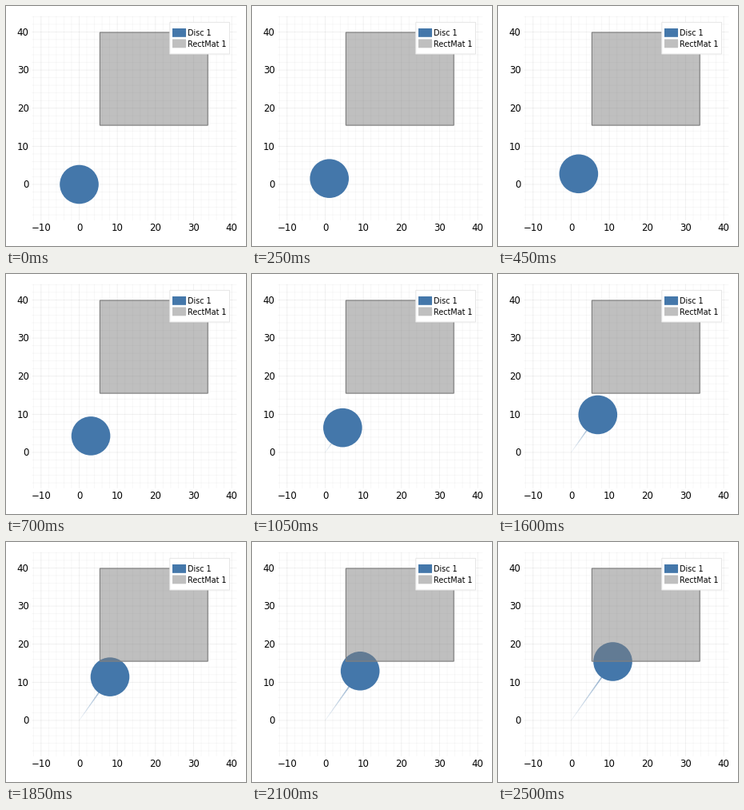
A matplotlib script for the animation above (2.55 s loop, 300 by 300 pixels).

```python
import numpy as np
import matplotlib.pyplot as plt
from matplotlib.animation import FuncAnimation
from matplotlib.collections import LineCollection
from matplotlib.colors import to_rgb
from matplotlib.patches import Circle, Rectangle

SIZE, DPI = 300, 100
PX = 72 / DPI               # one pixel in points
UNIT = 4.765                # pixels per data unit
X0, Y0 = 91.5, 223.0        # pixel position of the data origin
FRAMES, INTERVAL = 51, 50
VELOCITY = np.array([1.04, -1.47])  # pixels per step
BLUE, GRAY = "#4477AA", "#808080"
LEFT, RIGHT, TOP, BOTTOM = 33, 288, 13, 267.5

plt.rcParams["path.snap"] = False
fig = plt.figure(figsize=(SIZE / DPI, SIZE / DPI), dpi=DPI, facecolor="white")
ax = fig.add_axes([0, 0, 1, 1])
ax.set_xlim(0, SIZE)
ax.set_ylim(SIZE, 0)
ax.axis("off")


def label(x, y, text, size, ha):
    ax.text(x, y, text, fontsize=size * PX, family="DejaVu Sans",
            color="black", ha=ha, va="baseline", zorder=8)


def box(x, y, w, h, z, **style):
    ax.add_patch(Rectangle((x, y), w, h, zorder=z, **style))


def draw_grid():
    for value in range(-12, 46, 2):
        alpha = 0.07 if value % 10 == 0 else 0.04
        style = dict(color="black", alpha=alpha, lw=0.8 * PX, zorder=1)
        x, y = X0 + value * UNIT, Y0 - value * UNIT
        if LEFT <= x <= RIGHT:
            ax.plot([x, x], [TOP, BOTTOM], **style)
        if TOP <= y <= BOTTOM:
            ax.plot([LEFT, RIGHT], [y, y], **style)


def draw_ticks():
    for value in range(-10, 41, 10):
        text = str(value).replace("-", "\u2212")
        label(X0 + value * UNIT, 281, text, 11.8, "center")
        if value >= 0:
            label(28.6, Y0 - value * UNIT + 4.2, text, 11.8, "right")


def draw_legend():
    box(204.8, 20.4, 74.7, 39.6, 6, fc="white", ec="#e6e6e6", lw=PX)
    for text, y, fill in [("Disc 1", 28, BLUE), ("RectMat 1", 41.5, "#bfbfbf")]:
        box(208, y, 17, 10.8, 7, fc=fill, ec="none")
        label(226.7, y + 9.4, text, 9.7, "left")


draw_grid()
draw_ticks()
draw_legend()
box(117.4, 33, 134.8, 116.1, 5, fc=to_rgb(GRAY) + (0.5,), ec=GRAY, lw=1.2 * PX)

disc = ax.add_patch(Circle((X0, Y0), 24.3, fc=BLUE, ec="none", zorder=4))
trail = ax.add_collection(LineCollection([], zorder=3, capstyle="butt"))


def draw(step):
    path = np.array([X0, Y0]) + np.arange(step + 1)[:, None] * VELOCITY
    disc.center = tuple(path[-1])
    growth = np.linspace(0, 1, step)
    colors = np.tile(to_rgb(BLUE) + (1.0,), (step, 1))
    colors[:, 3] = 0.1 + 0.65 * growth
    trail.set_segments(np.stack([path[:-1], path[1:]], axis=1))
    trail.set_color(colors)
    trail.set_linewidth((0.7 + 1.3 * growth) * PX if step else [0])
    return disc, trail


anim = FuncAnimation(fig, draw, frames=FRAMES, interval=INTERVAL,
                     repeat=True, repeat_delay=0, blit=False)
plt.show()
```
